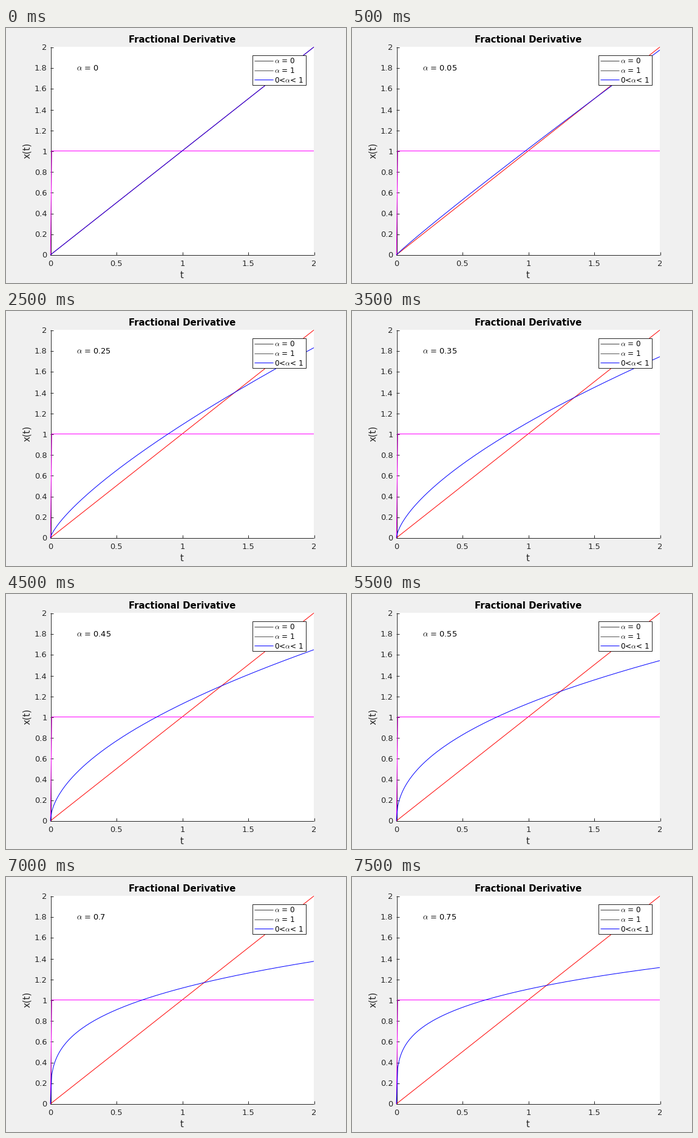
Write a matplotlib script that moves like this. It is 560x420 px and loops after 8000 ms.

```python
import math

import numpy as np
import matplotlib.pyplot as plt
from matplotlib.animation import FuncAnimation
from matplotlib.patches import Rectangle

W, H = 560, 420
LEFT, RIGHT, TOP, BOTTOM = 73.2, 507.0, 31.4, 373.6
FRAMES, INTERVAL = 16, 500
INK = "#262626"

plt.rcParams.update({
    "font.family": "DejaVu Sans",
    "mathtext.fontset": "cm",
    "toolbar": "None",
})

# At 72 dpi one point equals one pixel.
fig = plt.figure(figsize=(W / 72, H / 72), dpi=72, facecolor="#f0f0f0")
ax = fig.add_axes([0, 0, 1, 1])
ax.set_xlim(0, W)
ax.set_ylim(H, 0)
ax.axis("off")


def px(t):
    return LEFT + np.asarray(t) * (RIGHT - LEFT) / 2


def py(x):
    return BOTTOM - np.asarray(x) * (BOTTOM - TOP) / 2


def line(xs, ys, color, z=3):
    return ax.plot(xs, ys, color=color, lw=1, zorder=z,
                   solid_capstyle="butt", solid_joinstyle="round")[0]


def label(x, y, s, size=13, color=INK, ha="left", **kw):
    return ax.text(x, y, s, size=size, color=color, ha=ha, va="baseline",
                   zorder=8, **kw)


def box(x0, y0, x1, y1, edge, z):
    ax.add_patch(Rectangle((x0, y0), x1 - x0, y1 - y0, facecolor="white",
                           edgecolor=edge, lw=1, zorder=z))


def power(t, alpha):
    """Derivative of order alpha of x(t) = t."""
    return t ** (1 - alpha) / math.gamma(2 - alpha)


def draw_axes():
    box(73, 31, 507, 374, "none", 1)
    line([73.5, 73.5], [31, 374], INK, 2)
    line([73, 507], [373.5, 373.5], INK, 2)
    for k in range(11):
        y = math.floor(py(k / 5)) + 0.5
        line([73, 78], [y, y], INK, 2)
        label(67.5, y + 5, f"{k / 5:g}", ha="right")
    for k in range(5):
        x = math.floor(px(k / 2)) + 0.5
        line([x, x], [369, 374], INK, 2)
        label(x, 392, f"{k / 2:g}", ha="center")
    label(290, 24, "Fractional Derivative", 15, "black", "center",
          weight="bold")
    label(290, 412, "t", 15, ha="center")
    label(39, 202, "x(t)", 15, ha="center", rotation=90,
          rotation_mode="anchor")


def draw_legend():
    box(405.5, 44.5, 493.5, 93.5, INK, 6)
    rows = [
        (53.5, "#404040", r"$\alpha$ = 0"),
        (69.5, "#585858", r"$\alpha$ = 1"),
        (84.5, "blue", r"0<$\alpha$< 1"),
    ]
    for y, color, text in rows:
        line([409, 440], [y, y], color, 7)
        label(442, y + 5, text, 12, "black")


draw_axes()
draw_legend()

t = np.linspace(0, 2, 201)
line(px(t), py(t), "red")
line(px(t), py(np.where(t > 0, 1.0, 0.0)), "magenta", 4)
curve = line(px(t), py(t), "blue", 5)
note = label(116.4, 70, "", color="black")


def update(i):
    alpha = i / 20
    curve.set_ydata(py(power(t, alpha)))
    note.set_text(rf"$\alpha$ = {alpha:g}")
    return curve, note


anim = FuncAnimation(fig, update, frames=FRAMES, interval=INTERVAL,
                     repeat=True, repeat_delay=0, blit=False)
plt.show()
```
